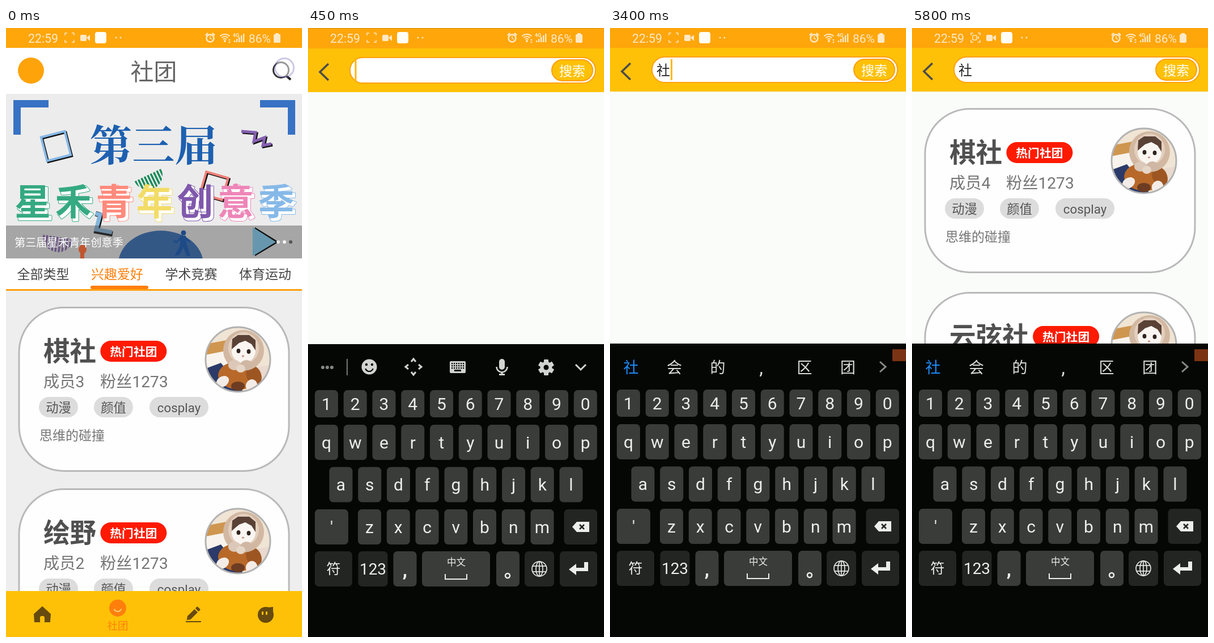
Recreate the animation shown at these times as an HTML page with a canvas. Size 522x1073 px, loop 5.9 s.

```html
<!DOCTYPE html>
<html lang="zh-CN">
<head>
<meta charset="utf-8">
<style>
html, body { margin: 0; width: 100%; height: 100%; overflow: hidden; }
canvas { display: block; }
</style>
</head>
<body>
<canvas id="stage" width="522" height="1073"></canvas>
<script>
const W = 522, H = 1073, LOOP = 5900;
const SANS = 'Roboto, "Noto Sans CJK SC", "Noto Sans CJK", sans-serif';
const SERIF = '"Noto Serif CJK SC", "Noto Sans CJK SC", "Noto Serif", serif';
const AMBER = '#ffc107', ORANGE = '#ffa60b', HOT = '#ff7f0c';
const screen = document.getElementById('stage').getContext('2d');
let g = screen;

const clamp = v => Math.max(0, Math.min(1, v));
const within = (t, a, b) => t >= a && t < b;

function layer(draw) {
  const c = document.createElement('canvas');
  c.width = W; c.height = H;
  const prev = g;
  g = c.getContext('2d');
  draw();
  g = prev;
  return c;
}
function paint(fill, stroke, lw) {
  if (fill) { g.fillStyle = fill; g.fill(); }
  if (stroke) { g.strokeStyle = stroke; g.lineWidth = lw || 2; g.stroke(); }
}
function rect(x, y, w, h, fill) { g.fillStyle = fill; g.fillRect(x, y, w, h); }
function box(x, y, w, h, r, fill, stroke, lw) {
  g.beginPath(); g.roundRect(x, y, w, h, r); paint(fill, stroke, lw);
}
function disc(x, y, r, fill, stroke, lw) {
  g.beginPath(); g.arc(x, y, r, 0, 7); paint(fill, stroke, lw);
}
function oval(x, y, rx, ry, fill, turn = 0) {
  g.beginPath(); g.ellipse(x, y, rx, ry, turn, 0, 7); paint(fill);
}
function arc(x, y, r, a, b, stroke, lw) {
  g.beginPath(); g.arc(x, y, r, a, b); paint(null, stroke, lw);
}
function poly(pts, fill, stroke, lw, close = !!fill) {
  g.beginPath();
  for (let i = 0; i < pts.length; i += 2) g.lineTo(pts[i], pts[i + 1]);
  if (close) g.closePath();
  paint(fill, stroke, lw);
}
// Text with its vertical middle at cy, on a whole-pixel baseline.
function text(s, x, cy, size, color, align = 'left', weight = 400, family = SANS) {
  g.font = `${weight} ${size}px ${family}`;
  g.textAlign = align;
  g.fillStyle = color;
  g.fillText(s, x, Math.round(cy + size * .365));
}
function at(x, y, turn, draw) {
  g.save(); g.translate(x, y); g.rotate(turn); draw(); g.restore();
}

// ---------- status bar ----------
function statusIcons(t) {
  const c = '#ffe9c6';
  text('22:59', 39, 18, 21.3, c);
  for (const sx of [-1, 1]) for (const sy of [-1, 1])
    poly([112 + sx * 4, 17 + sy * 8, 112 + sx * 8, 17 + sy * 8, 112 + sx * 8, 17 + sy * 4], null, c, 1.5);
  if (t > 500 && (t + 450) % 1000 < 500) {
    box(107, 13, 7, 8, 1, null, c, 1.5);
    poly([115, 17, 118, 14, 118, 20], c);
  }
  box(131, 12, 11, 11, 2, c);
  poly([142, 17, 148, 12, 148, 23], c);
  box(157, 7, 20, 20, 4, '#fffdf5');
  disc(194, 17, 1.5, c); disc(202, 17, 1.5, c);
  disc(360, 18, 6.5, null, c, 2.5);
  poly([360, 14, 360, 18, 363, 20], null, c, 1.5);
  poly([352, 13, 356, 9], null, c, 2.5); poly([364, 9, 368, 13], null, c, 2.5);
  for (const r of [4, 8, 12]) arc(386, 23, r, -2.35, -.8, c, 2);
  disc(386, 23, 2, c);
  poly([392, 24, 396, 24, 394, 27], c); poly([392, 22, 396, 22, 394, 19], c);
  text('4G', 400, 13, 9, c, 'left', 700);
  for (let i = 0; i < 5; i++) rect(402 + i * 4, 22 - i * 3, 2.4, 3 + i * 3, c);
  text('86%', 428, 18, 21, c);
  box(472, 11, 12, 15, 2, c); rect(475, 9, 6, 3, c);
}

// ---------- club cards ----------
function cat(x, y) {
  g.save();
  g.beginPath(); g.arc(x, y, 57, 0, 7); g.clip();
  g.translate(x, y);
  rect(-57, -57, 114, 114, '#f0e4d4');
  poly([-57, -27, -20, -34, -16, -16, -57, -8], '#cf9650');
  poly([-57, -8, -16, -16, -16, 10, -57, 18], '#f8f3ec');
  poly([-57, 16, -30, 6, 10, 57, -57, 57], '#2b3a68');
  poly([32, 14, 57, 10, 57, 57, 20, 57], '#e9d9ce');
  oval(2, 28, 37, 25, '#b8692a');
  oval(28, 28, 13, 18, '#9d5622', -.4);
  oval(-27, 39, 12, 9, '#f4ece6', -.6);
  oval(24, 46, 10, 11, '#f4ece6', .4);
  oval(0, 47, 12, 8, '#6d3c22');
  oval(10, -16, 36, 36, '#d2b8a2');
  oval(10, -20, 27, 28, '#e3cfbd');
  oval(10, -15, 21, 21, '#faf5f1');
  poly([-11, -18, -10, -36, 0, -43, 20, -43, 31, -34, 31, -16, 24, -27, 13, -33, 2, -29], '#5a4136');
  oval(1, -15, 3.4, 4, '#2f231e'); oval(19, -14, 3.4, 4, '#2f231e');
  oval(9, -6, 2.2, 1.5, '#c98a80');
  oval(-6, 10, 11, 9, '#dcc8b8'); oval(15, 10, 11, 9, '#cfb7a4');
  oval(5, 16, 8, 7, '#e6d6c8');
  g.restore();
  disc(x, y, 57, null, '#b2b2b2', 3);
}
function card(y, name, members) {
  box(23, y + .5, 476, 288, 79, '#fefefe', '#b9b9b9', 3);
  text(name, 66, y + 77, 46.6, '#505050', 'left', 700);
  const bx = 73 + name.length * 46.7;
  box(bx, y + 59, 117, 37, 18.5, '#ff1a00');
  text('热门社团', bx + 58.5, y + 78, 20.8, '#fff', 'center', 700);
  text('成员' + members, 66, y + 131, 28.2, '#757575');
  text('粉丝1273', 166, y + 131, 28.2, '#757575');
  [['动漫', 58, 69], ['颜值', 155, 69], ['cosplay', 253, 104]].forEach(([s, x, w]) => {
    box(x, y + 158, w, 36, 18, '#dcdcdc');
    text(s, x + w / 2, y + 177, 22.3, '#565656', 'center');
  });
  text('思维的碰撞', 59, y + 226, 23, '#757575');
  cat(409, y + 92);
}

// ---------- home ----------
function tiltedSquare(x, y, size, turn, color) {
  at(x + 2, y + 2, turn, () => box(-size / 2, -size / 2, size, size, 0, null, '#111', 4));
  at(x, y, turn, () => box(-size / 2, -size / 2, size, size, 0, null, color, 4));
}
function stripes(x, y, r, turn, color) {
  at(x, y, turn, () => {
    g.beginPath(); g.arc(0, 0, r, 0, Math.PI); g.clip();
    for (let i = -r; i < r; i += 6) rect(i, 0, 3.4, r, color);
  });
}
function banner() {
  g.save();
  g.beginPath(); g.rect(0, 116, W, 290); g.clip();
  rect(0, 116, W, 290, '#ececec');
  const blue = '#3872c4';
  rect(13, 127, 62, 13, blue); rect(13, 127, 13, 61, blue);
  rect(448, 127, 62, 13, blue); rect(497, 127, 13, 61, blue);
  tiltedSquare(88, 208, 43, -.25, '#86b8e6');
  const zig = [415, 182, 440, 184, 437, 200, 456, 193, 453, 207, 468, 204];
  poly(zig.map(v => v + 2), null, '#111', 5);
  poly(zig, null, '#8560b0', 5);
  text('第三届', 260, 207, 75, '#1d60b0', 'center', 700, SERIF);
  stripes(250, 259, 26, -.45, '#158a58');
  tiltedSquare(367, 278, 40, .28, '#f08078');
  poly([158, 327, 167, 330, 160, 358, 188, 363], null, '#111', 9);
  poly([158, 327, 166, 329, 159, 355, 187, 360], null, '#82b4dc', 7);
  stripes(92, 368, 27, .15, '#8560b0');
  const inks = ['#35a982', '#35a982', '#ff8a7c', '#f3dc66', '#8058ac', '#ee86b8', '#86b9e8'];
  [...'星禾青年创意季'].forEach((ch, i) => {
    const x = 47 + i * 71.6;
    g.font = `900 64px ${SANS}`; g.textAlign = 'center'; g.lineJoin = 'round';
    g.lineWidth = 4; g.strokeStyle = inks[i]; g.strokeText(ch, x + 4, 333);
    g.lineWidth = 2; g.strokeStyle = '#fff'; g.strokeText(ch, x + 4, 333);
    g.fillStyle = '#fff'; g.fillText(ch, x + 4, 333);
    g.fillStyle = inks[i]; g.fillText(ch, x, 329);
  });
  oval(273, 416, 75, 59, '#2866b4');
  rect(0, 348, W, 58, 'rgba(70,70,70,.42)');
  // small figure on the dome
  const figure = '#1e4a86';
  disc(313, 361, 4.5, figure);
  poly([307, 366, 317, 366, 319, 382, 325, 401, 319, 402, 313, 387, 305, 400, 297, 402, 307, 383], figure);
  poly([309, 369, 300, 378, 296, 374], null, figure, 3);
  poly([316, 369, 324, 377], null, figure, 3);
  oval(135, 390, 7, 8, '#c0562f'); rect(131, 394, 7, 12, '#c0562f');
  poly([439, 351, 481, 377, 439, 402], '#111');
  poly([435, 351, 476, 377, 435, 402], '#6797ae');
  text('第三届星禾青年创意季', 15, 378, 19.2, '#fff');
  disc(480, 377, 3, '#e4e4e4'); disc(491, 377, 3, '#f4f4f4'); disc(502, 377, 3, '#555');
  g.restore();
}
function navBar() {
  const brown = '#674a0e';
  rect(0, 992, W, 81, AMBER);
  poly([50, 1033, 64, 1020, 78, 1033, 77, 1046, 51, 1046], brown, brown, 2);
  box(60, 1036, 8, 12, 3, AMBER);
  disc(197, 1022, 15, HOT);
  arc(197, 1021, 7, .4, 2.74, '#ffd27a', 2);
  text('社团', 197, 1053, 18.5, HOT, 'center');
  at(331, 1031, -.78, () => {
    box(-12, -4, 18, 8, 0, brown);
    poly([-12, -4, -17, 0, -12, 4], brown);
    box(8, -4, 5, 8, 1, brown);
  });
  rect(317, 1045, 27, 2, brown);
  disc(458, 1034, 14, brown);
  poly([460, 1021, 471, 1020, 471, 1031], brown);
  box(451, 1028, 3, 6, 1, AMBER); box(458, 1028, 3, 6, 1, AMBER);
}
function drawHome() {
  rect(0, 0, W, H, '#eee');
  rect(0, 0, W, 35, ORANGE);
  rect(0, 35, W, 81, '#fff');
  disc(44, 75, 23, '#ffa30a');
  text('社团', 260.5, 77, 41, '#666', 'center');
  disc(485, 74, 13.5, null, '#333', 3);
  poly([494, 84, 502, 91], null, '#222', 4);
  banner();
  rect(0, 406, W, 55, '#fff');
  rect(0, 460, W, 3, '#ff9f0c');
  ['全部类型', '兴趣爱好', '学术竞赛', '体育运动'].forEach((s, i) =>
    text(s, 65.5 + i * 130.5, 433.5, 23, i === 1 ? HOT : '#444', 'center'));
  box(149, 454, 102, 6, 3, HOT);
  card(492, '棋社', 3);
  card(812, '绘野', 2);
  navBar();
}

// ---------- keyboard ----------
const INK = '#eceeec', KEY = '#3a3c3a', DARK = '#232523', PITCH = 50.75;
const BLACK = '#050705', TOP = 556;
function key(x, y, w, h, label, fill = KEY, size = 30) {
  box(x, y, w, h, 7, fill);
  if (label) text(label, x + w / 2, y + h / 2, size, INK, 'center');
}
function keyRow(chars, x, y, h) {
  [...chars].forEach((c, i) => key(x + i * PITCH, y, 41, h, c));
}
function drawKeyboard() {
  rect(0, TOP, W, H - TOP, BLACK);
  keyRow('1234567890', 12, 637, 48);
  keyRow('qwertyuiop', 12, 698, 62);
  keyRow('asdfghjkl', 37.5, 772.5, 62);
  keyRow('zxcvbnm', 88, 847, 62);
  key(12, 847, 59, 62, "'");
  key(451.5, 847, 58.5, 62, '', DARK);
  poly([466, 878, 474, 869, 496, 869, 496, 887, 474, 887], INK);
  poly([479, 874, 487, 882], null, DARK, 2.5); poly([487, 874, 479, 882], null, DARK, 2.5);
  key(12, 921, 66, 62, '符', DARK, 25);
  key(88.5, 921, 52, 62, '123', DARK, 28);
  key(150.5, 921, 41, 62, ''); text(',', 171, 953, 34, INK, 'center', 700);
  key(201, 921, 120, 62, ''); text('中文', 261.5, 940, 16.5, INK, 'center');
  poly([242, 961, 242, 970, 280, 970, 280, 961], null, INK, 2);
  key(332, 921, 41, 62, ''); disc(352, 964, 4, null, INK, 2.5);
  key(382, 921, 52, 62, '', DARK);
  disc(408, 952, 13, null, INK, 1.6);
  g.beginPath(); g.ellipse(408, 952, 6, 13, 0, 0, 7); paint(null, INK, 1.6);
  poly([408, 939, 408, 965], null, INK, 1.6);
  poly([396, 947, 420, 947], null, INK, 1.6); poly([396, 957, 420, 957], null, INK, 1.6);
  key(444, 921, 66, 62, '', DARK);
  poly([460, 953, 473, 943, 473, 950, 487, 950, 487, 940, 494, 940, 494, 956, 473, 956, 473, 963], INK);
}
function drawTools() {
  const c = '#d2d4d2';
  for (const x of [26, 34, 42]) disc(x, 597, 3, '#858785');
  rect(68, 582, 2, 29, '#777');
  disc(108, 596, 13.5, c);
  disc(103, 592, 2.2, BLACK); disc(113, 592, 2.2, BLACK); arc(108, 597, 7, .3, 2.84, BLACK, 2.2);
  for (let i = 0; i < 4; i++)
    at(186, 596, i * Math.PI / 2, () => poly([-4, -9, 0, -14, 4, -9], null, c, 3));
  box(250, 586, 28, 21, 2, c);
  for (let y = 589; y < 598; y += 4) for (let x = 253; x < 275; x += 4) rect(x, y, 2.3, 2.3, BLACK);
  rect(258, 601, 12, 3, BLACK);
  box(337, 582, 10, 19, 5, c);
  arc(342, 596, 9.5, 0, Math.PI, c, 2.5); rect(340.5, 605, 3, 3, c); rect(337, 608, 10, 3, c);
  for (let i = 0; i < 6; i++) at(420, 597, i * Math.PI / 3, () => box(-4, -14, 8, 10, 1, c));
  disc(420, 597, 10.5, c); disc(420, 597, 4.5, BLACK);
  poly([472, 592, 481, 601, 490, 592], null, c, 3);
}
function snake(x, y) {
  g.lineCap = 'round';
  g.beginPath();
  g.moveTo(x - 9, y - 7); g.quadraticCurveTo(x - 5, y - 14, x, y - 8);
  g.bezierCurveTo(x + 6, y, x - 14, y + 1, x - 9, y + 8);
  g.bezierCurveTo(x - 4, y + 15, x + 9, y + 11, x + 7, y + 2);
  g.quadraticCurveTo(x + 10, y - 2, x + 11, y + 6);
  paint(null, '#2fa45a', 7);
  g.lineCap = 'butt';
  disc(x - 8, y - 9, 1.5, '#10341f');
}
function candidates(words) {
  words.forEach((s, i) => {
    const x = 37 + i * 76.5;
    if (s === '~') snake(x, 598);
    else if (s === ',') text(s, x, 598, 34, '#dcdedc', 'center');
    else text(s, x, 598, 27, i ? '#dcdedc' : '#1e8cf5', 'center');
  });
  poly([476, 588, 486, 597, 476, 606], null, '#8a8c8a', 3);
  rect(498, 566, 24, 21, '#7a3413');
}

// ---------- search ----------
const TAPS = [
  { from: -80, to: 120, x: 491, y: 70 },
  { from: 2050, to: 2190, x: 109, y: 818, key: 's', top: 772 },
  { from: 2290, to: 2420, x: 311, y: 818, key: 'h', top: 772 },
  { from: 2510, to: 2690, x: 134, y: 745, key: 'e', top: 698 },
  { from: 3050, to: 3210, x: 37, y: 602 },
  { from: 4070, to: 4250, x: 465, y: 76 }
];
const COMMIT = 3250, RESULTS = 4400;

function cursorOn(t) {
  if (t < 800) return true;
  if (t < 2800) return (t + 700) % 1000 < 500;
  return within(t, COMMIT, 3650) || within(t, 4150, 4700) || within(t, 5300, 5800);
}
function searchPage(t) {
  rect(0, 0, W, H, '#fafcfa');
  rect(0, 0, W, 35, ORANGE);
  rect(0, 35, W, 77, AMBER);
  poly([36, 62, 21, 76.5, 36, 91], null, '#4b4b4b', 3.5);
  box(74, 51, 433, 45, 22.5, '#fff', '#ff9f0c', 2);
  box(430, 55, 72, 37, 18.5, AMBER, '#ff9f0c', 2);
  text('搜索', 466, 75, 23, '#fff', 'center');
  const typed = t >= COMMIT;
  if (typed) text('社', 82, 74.5, 24, '#222');
  if (cursorOn(t)) rect(typed ? 107 : 82.5, 55, 3, 37, '#ffb60a');
  if (t >= RESULTS) { card(142, '棋社', 4); card(466, '云弦社', 4); }
}
function typing(t) {
  if (t < 2100) return;
  rect(0, TOP, W, 80, BLACK);
  if (t >= COMMIT) return candidates(['社', '会', '的', ',', '区', '团']);
  const pinyin = t < 2330 ? 's' : t < 2560 ? 'sh' : 'she';
  candidates(pinyin === 'she' ? ['社', '射', '舍', '设', '蛇', '~']
    : pinyin === 'sh' ? ['是', '上', '说', '时', '事', '谁'] : ['是', '说', '三', '谁', '所', '啥']);
  g.font = `24px ${SANS}`;
  box(0, 511, g.measureText(pinyin).width + 29, 44, [0, 7, 0, 0], '#8a8c8a');
  text(pinyin, 15, 534, 24, '#fff');
}
function touches(t) {
  for (const p of TAPS) {
    const a = clamp(Math.min((t - p.from) / 80, (p.to + 150 - t) / 150));
    if (!a) continue;
    if (p.key && t < p.to + 20) {
      box(p.x - 37, p.top - 118, 74, 98, 15, DARK);
      text(p.key, p.x, p.top - 67, 48, '#fff', 'center');
    }
    g.globalAlpha = a;
    disc(p.x, p.y, 15.5, 'rgba(255,255,255,.5)');
    disc(p.x, p.y, 16.5, null, 'rgba(110,100,180,.35)', 3);
    g.globalAlpha = 1;
  }
}

const home = layer(drawHome);
const keyboard = layer(() => { drawKeyboard(); drawTools(); });

function render(t) {
  const left = 1 - clamp((t - 100) / 400);
  const slide = 344 * left ** 3;
  if (left > 0) {
    const done = 1 - left ** 3;
    rect(0, 0, W, H, '#eee');
    g.drawImage(home, 0, Math.round(-18 * done));
    rect(0, 0, W, H, `rgba(0,0,0,${.14 * done})`);
  }
  if (t > 100) {
    g.save();
    g.translate(0, Math.round(slide));
    g.globalAlpha = clamp((t - 100) / 150);
    searchPage(t);
    g.globalAlpha = clamp((t - 200) / 150);
    g.drawImage(keyboard, 0, -Math.round(slide * .04));
    g.restore();
    typing(t);
  }
  statusIcons(t);
  touches(t);
}

const start = performance.now();
function frame() {
  render((performance.now() - start) % LOOP);
  requestAnimationFrame(frame);
}
frame();
</script>
</body>
</html>
```
